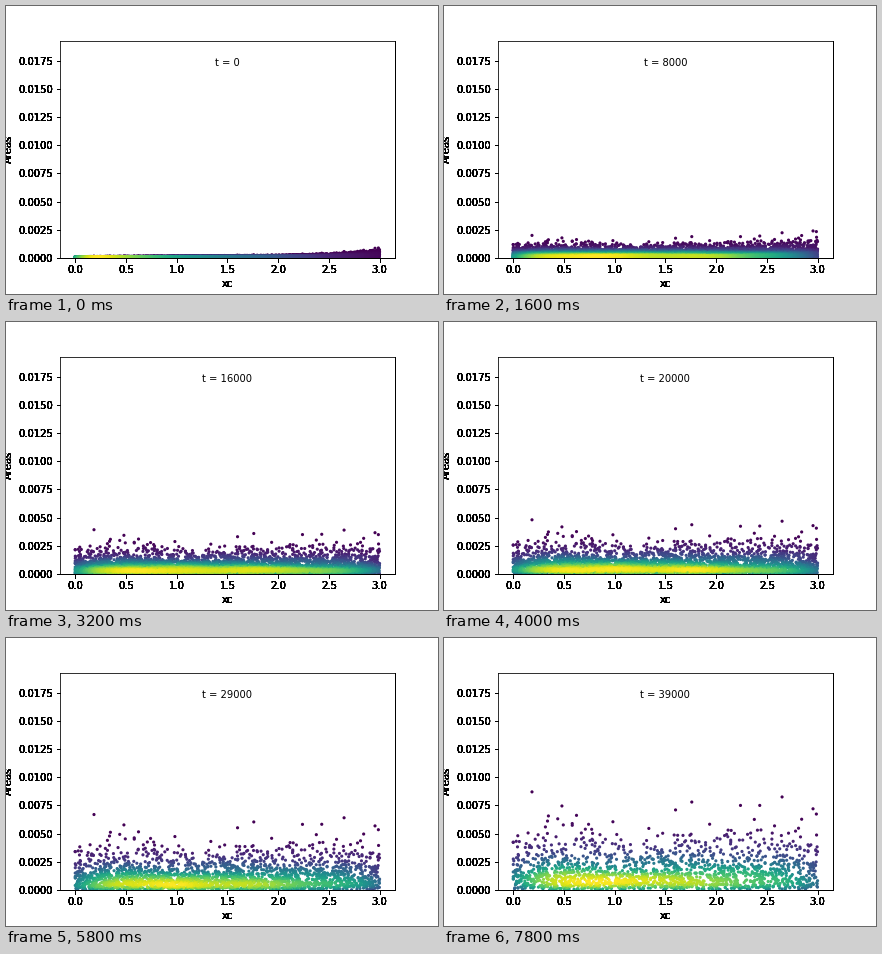
Recreate the animation shown at these times as a matplotlib script. Size 432 by 288 pixels, loop 8 s.

```python
import numpy as np
import matplotlib.pyplot as plt
from matplotlib.animation import FuncAnimation

FRAMES, STEP_MS = 40, 200
END = FRAMES - 1
RATE = 4.45e-5          # growth of the size scale per 1000 steps
LAYERS = 10
XLIM, YLIM = (-0.15, 3.15), (0, 0.01928)

# Position and final area of the few cells that outgrow the rest
BIG_X = np.array([0.185, 0.48, 1.6, 1.76, 2.24, 2.43, 2.65, 2.955])
BIG_AREA = np.array([8.7, 7.45, 7.1, 7.8, 7.5, 7.5, 8.25, 7.2]) * 1e-3
AREA_CAP = 6.8e-3       # final limit for all other cells


def start_size(x):
    return 6e-5 + 3e-5 * x + 2.8e-4 * (x / 3) ** 8


def size_scale(x, t):
    return np.hypot(start_size(x), RATE * t)


def spread(t):
    return 0.82 - 0.42 * np.exp(-t / 3)


def rank_for(x, area, t):
    """Rank of a cell that reaches the given area at time t."""
    lam = size_scale(x, t)
    return start_size(x) / lam * np.exp(-(area / lam) ** (1 / spread(t)))


def make_cells():
    rng = np.random.default_rng(12)
    grid = np.linspace(0, 3, 600)
    per_length = (1.1 - 0.07 * grid) / (0.92 * start_size(grid))
    cdf = np.cumsum(per_length) * (grid[1] - grid[0])
    x = np.interp(rng.random(int(cdf[-1])) * cdf[-1], cdf, grid)
    rank = rng.random(x.size)
    keep = rank > rank_for(x, AREA_CAP, END)
    return (np.append(x[keep], BIG_X),
            np.append(rank[keep], rank_for(BIG_X, BIG_AREA, END)))


def areas_at(t):
    """Positions and areas of the cells that still exist at time t."""
    lam = size_scale(cell_x, t)
    ratio = start_size(cell_x) / lam / cell_rank
    alive = ratio > 1
    return cell_x[alive], lam[alive] * np.log(ratio[alive]) ** spread(t)


def density(x, y, bins=240):
    """Gaussian kernel density on a grid, read back at each point."""
    hist, xe, ye = np.histogram2d(x, y, bins, [(0, 3), (0, y.max())])

    def kernel(edges, values):
        mid = (edges[1:] + edges[:-1]) / 2
        width = values.std() * values.size ** (-1 / 6)
        return np.exp(-0.5 * ((mid[:, None] - mid) / width) ** 2)

    smooth = kernel(xe, x) @ hist @ kernel(ye, y)
    ix = np.minimum((x / 3 * bins).astype(int), bins - 1)
    iy = np.minimum((y / y.max() * bins).astype(int), bins - 1)
    return smooth[ix, iy]


cell_x, cell_rank = make_cells()

plt.rcParams["font.family"] = "DejaVu Sans"
fig = plt.figure(figsize=(6, 4), dpi=72)

# Stacked axes give the labels their heavy look
for layer in range(LAYERS):
    ax = fig.add_axes([0.125, 0.125, 0.775, 0.755])
    ax.set(xlim=XLIM, ylim=YLIM, xlabel="xc", ylabel="Areas")
    ax.set_xticks(np.arange(0, 3.1, 0.5))
    ax.set_yticks(np.arange(0, 0.0176, 0.0025))
    ax.patch.set_visible(False)
    ax.spines[["left", "top"]].set_visible(layer == LAYERS - 1)

dots = ax.scatter([], [], c=[], s=10, cmap="viridis", linewidths=0)
label = ax.text(0.5, 0.885, "", transform=ax.transAxes, ha="center")


def update(i):
    x, y = areas_at(i)
    z = density(x, y)
    order = z.argsort()
    dots.set_offsets(np.column_stack([x, y])[order])
    dots.set_array(z[order])
    dots.set_clim(z.min(), z.max())
    label.set_text(f"t = {i * 1000}")
    return dots, label


anim = FuncAnimation(fig, update, frames=FRAMES, interval=STEP_MS,
                     init_func=lambda: update(0), repeat=True, repeat_delay=0)
plt.show()
```
